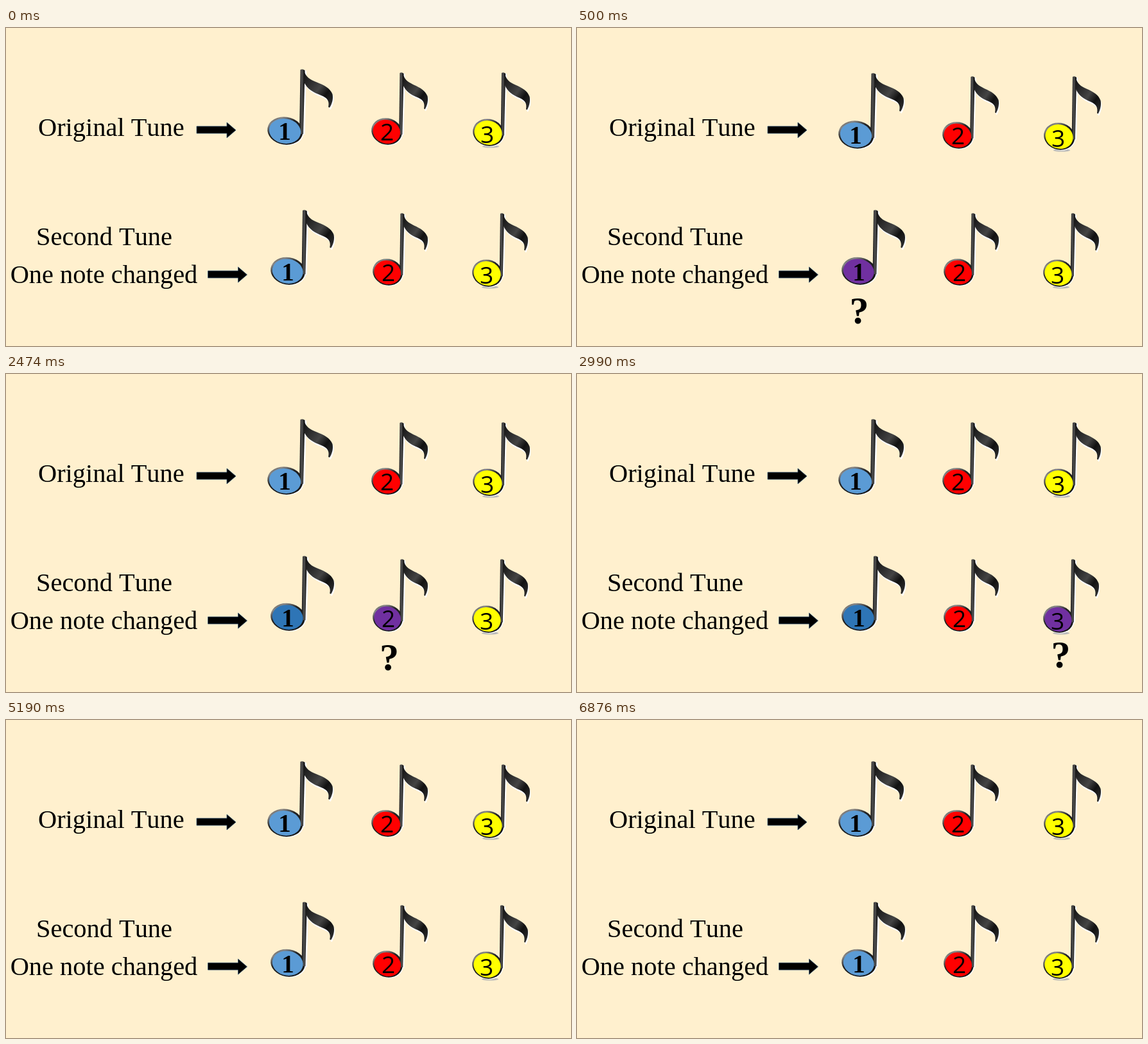
These frames come from a looping animation (880 by 495 pixels, 8 s). An HTML page:

```html
<!DOCTYPE html>
<html lang="en">
<head>
<meta charset="utf-8">
<title>Two tunes</title>
<style>
  html, body { margin: 0; width: 100%; height: 100%; overflow: hidden; background: #fff0ce; }
  svg { display: block; }
  text { font: 40.4px "Liberation Serif", "Times New Roman", serif; font-kerning: none; }
  .mid { text-anchor: middle; }
  .one { font-size: 39px; font-weight: bold; }
  .sans { font: 37px "Open Sans", "Noto Sans", sans-serif; }
  #ask { font-size: 60px; font-weight: bold; }
</style>
</head>
<body>
<svg id="stage" width="880" height="495" viewBox="0 0 880 495">
  <defs>
    <linearGradient id="rim" x1="0" y1="0" x2="1" y2="1">
      <stop offset="0" stop-color="#333"/>
      <stop offset=".2" stop-color="#888"/>
      <stop offset=".4" stop-color="#222"/>
      <stop offset="1" stop-color="#111"/>
    </linearGradient>
    <linearGradient id="rod">
      <stop offset="0" stop-color="#111"/>
      <stop offset=".45" stop-color="#555"/>
      <stop offset="1" stop-color="#000"/>
    </linearGradient>
    <linearGradient id="wing" x1="0" y1="0" x2="1" y2="1">
      <stop offset="0" stop-color="#111"/>
      <stop offset=".5" stop-color="#444"/>
      <stop offset=".7" stop-color="#111"/>
      <stop offset="1" stop-color="#333"/>
    </linearGradient>
    <ellipse id="head" cx="27.8" cy="96" rx="27.8" ry="21.5" transform="rotate(9 27.8 96)"/>
    <path id="stem" d="M51.5 1Q55 -1 58.5 2L56 101H50Z"/>
    <path id="flag" d="M57.5 3C60 12 66 16 76 20C89 25 98 30 101.500 39C103 46 101 54 97 60L95 59C97 50 94 45 84 41C71 36 62 31 57 20Z"/>
    <g id="fringe" fill="#fff">
      <use href="#head" x="1.5" y="1"/>
      <use href="#stem" x="2.500" y="1"/>
      <use href="#flag" x="1.5" y="3"/>
    </g>
    <g id="body">
      <use href="#fringe"/>
      <use href="#head" fill="url(#rim)"/>
      <use href="#stem" fill="url(#rod)"/>
      <use href="#flag" fill="url(#wing)"/>
    </g>
    <path id="arrow" d="M0 6H47V0L61 12L47 24V17H0Z" stroke="#31516f" stroke-width=".8"/>
  </defs>
  <text x="50" y="168">Original Tune</text>
  <text x="47" y="338">Second Tune</text>
  <text x="6.700" y="397">One note changed</text>
  <use href="#arrow" x="297" y="147"/>
  <use href="#arrow" x="314.5" y="372"/>
  <g id="top"></g>
  <g id="low"></g>
  <text id="ask" class="mid">?</text>
</svg>
<script>
const $ = id => document.getElementById(id);
const BLUE = '#5b9bd5', DEEP = '#2e75b6', RED = '#f00', YELLOW = '#ff0', PURPLE = '#7030a0';
const base = [BLUE, RED, YELLOW];
const digitAt = [[27, 110], [24.5, 106], [22.5, 110]];

// x, y, width, height of each note
const rows = {
  top: [[407, 64, 102, 118], [569, 69, 88, 113], [727, 69, 89, 115]],
  low: [[412, 283, 99, 117], [571, 288, 86, 113], [726, 288, 87, 115]]
};

function note([x, y, w, h], i) {
  const [dx, dy] = digitAt[i];
  const shadow = i === 2 ? '<ellipse cx="28" cy="115.5" rx="13" ry="2" fill="#bbb"/>' : '';
  return `<g transform="translate(${x} ${y})">
    ${shadow}
    <g transform="scale(${w / 102} ${h / 118})">
      <use href="#body"/>
      <ellipse class="fill" cx="27.5" cy="96.5" rx="24.8" ry="19.3" transform="rotate(9 27.5 96.5)" fill="${base[i]}"/>
    </g>
    <text class="mid ${i ? 'sans' : 'one'}" x="${dx}" y="${dy}">${i + 1}</text>
  </g>`;
}
for (const id in rows) $(id).innerHTML = rows[id].map(note).join('');
const fills = [...$('low').querySelectorAll('.fill')];

// start time, index of the changed note, first note's colour
const steps = [[0, -1, BLUE], [500, 0, BLUE], [1700, 1, DEEP], [2990, 2, DEEP], [5190, -1, BLUE]];
const askAt = [[439.5, 460], [597, 461], [753.5, 457]];

function draw() {
  const t = performance.now() % 8000;
  const [, changed, first] = steps.findLast(s => t >= s[0]);
  const asking = changed >= 0;
  $('top').setAttribute('transform', `translate(0 ${asking ? 6 : 0})`);
  fills.forEach((f, i) => f.setAttribute('fill', i === changed ? PURPLE : i ? base[i] : first));
  $('ask').style.display = asking ? '' : 'none';
  if (asking) {
    $('ask').setAttribute('x', askAt[changed][0]);
    $('ask').setAttribute('y', askAt[changed][1]);
  }
  requestAnimationFrame(draw);
}
draw();
</script>
</body>
</html>
```
